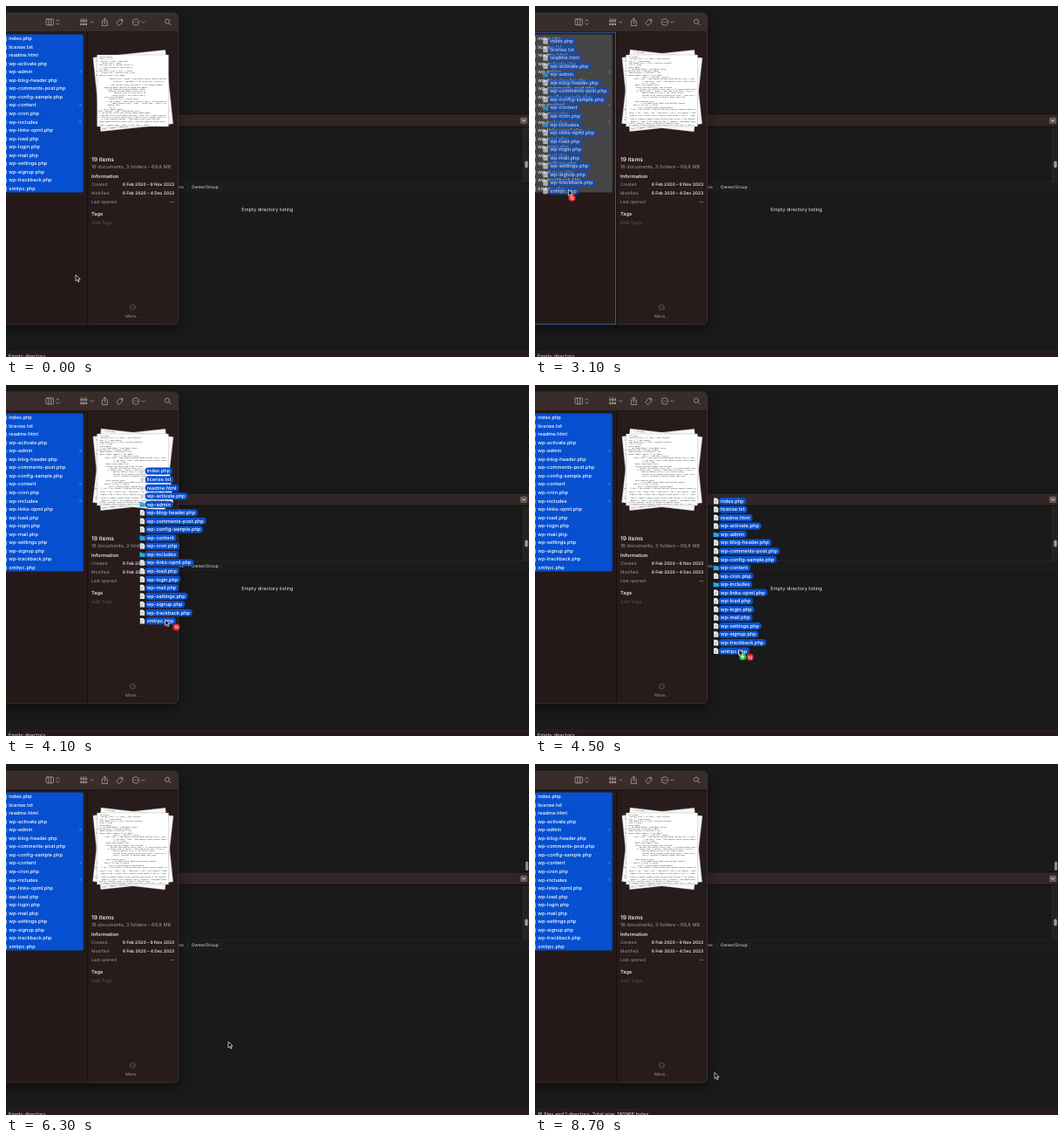
These frames come from a looping animation (600 px wide and 402 px high, 8.8 s). An HTML page:

```html
<!DOCTYPE html>
<html lang="en">
<head>
<meta charset="utf-8">
<title>Dragging files to an empty folder</title>
<style>
html, body { margin: 0; width: 100%; height: 100%; overflow: hidden; background: #1a1a1a; }
svg { display: block; width: 100vw; height: 100vh; }
text { font-family: Inter, "Open Sans", sans-serif; text-rendering: geometricPrecision; fill: #e6e3e2; white-space: pre; }
.name { font-size: 5.6px; font-weight: 500; fill: #fff; }
.bold { font-weight: 600; }
.dim { fill: #a19897; }
.code text { font: 1.9px "Liberation Mono", monospace; fill: #111; }
.icon { fill: none; stroke: #aaa19f; stroke-width: .8; stroke-linecap: round; stroke-linejoin: round; }
.faint { stroke: #857a79; stroke-width: .55; }
</style>
</head>
<body>
<svg id="stage" viewBox="0 0 600 402" preserveAspectRatio="none">
  <defs>
    <clipPath id="front"><rect x="104.500" y="56" width="82" height="82"/></clipPath>
    <filter id="shade" x="-20%" y="-20%" width="140%" height="140%" color-interpolation-filters="sRGB">
      <feDropShadow dx="0" dy="5" stdDeviation="7" flood-color="#000" flood-opacity=".5"/>
    </filter>
  </defs>

  <!-- transfer client -->
  <rect width="600" height="402" fill="#1a1a1a"/>
  <rect y="123" width="600" height="16" fill="#151111"/>
  <rect y="124.300" width="600" height="13.500" fill="#312625"/>
  <rect x="590" y="127.500" width="8" height="7.500" rx="1.500" fill="#675c5a"/>
  <path d="M592.300 130.300l1.700 1.800 1.700-1.800" fill="none" stroke="#eee" stroke-width=".9"/>
  <rect x="593.500" y="139" width="6.500" height="62" fill="#272020"/>
  <rect x="593.200" y="139" width=".6" height="62" fill="#3c3231"/>
  <rect x="595.300" y="177.500" width="3.400" height="8" rx="1.700" fill="#a29b9a"/>
  <rect y="201" width="600" height="1.200" fill="#292121"/>
  <rect y="202.200" width="600" height="9.300" fill="#1c1b1b"/>
  <rect y="211.500" width="600" height=".6" fill="#272626"/>
  <path d="M208.800 204v6.500M246.800 204v6.500" stroke="#363535" stroke-width=".6"/>
  <text x="195.500" y="208.700" font-size="4.850">ons</text>
  <text x="212.800" y="208.700" font-size="4.850">Owner/Group</text>
  <text id="empty" x="270.300" y="234.700" font-size="5.600">Empty directory listing</text>
  <rect id="thumb" x="596" y="111.500" width="3.200" height="10.500" rx="1.600" fill="#8b8b8b"/>
  <rect y="395.800" width="600" height="6.200" fill="#261b1b"/>
  <rect y="395.500" width="600" height=".6" fill="#312626"/>
  <text id="status" x="2.800" y="402.900" font-size="5.680"></text>

  <!-- file window -->
  <g filter="url(#shade)">
    <rect x="-12" y="8" width="209.700" height="356.700" rx="5.500" fill="#281b1b" stroke="#51474600" stroke-width=".6"/>
  </g>
  <path d="M0 8.400H192.200a5.100 5.100 0 0 1 5.100 5.100V29.500H0z" fill="#382d2b"/>
  <rect x="-12" y="8" width="209.700" height="356.700" rx="5.500" fill="none" stroke="#514746" stroke-width=".6"/>
  <rect y="30" width="93.500" height="334.300" fill="#251a19"/>
  <path d="M0 29.700H197.300" stroke="#181111" stroke-width=".7"/>
  <path d="M93.700 30V364.300" stroke="#120c0c" stroke-width=".8"/>
  <g class="icon">
    <rect x="46" y="15" width="8.500" height="6.800" rx="1"/>
    <path d="M48.900 15v6.800M51.700 15v6.800M57.800 17.200l1.600-1.700 1.600 1.700M57.800 19.800l1.600 1.700 1.600-1.700"/>
    <path d="M85.500 15h7.500M85.500 18.900h7.500" stroke-width=".5"/>
    <path d="M85.300 16.900h2m.8 0h2m.8 0h2M85.300 21h2m.8 0h2m.8 0h2" stroke-width="1.900" stroke-linecap="butt"/>
    <path d="M96.700 17.800l1.600 1.600 1.600-1.600M155.700 17.800l1.600 1.600 1.600-1.600"/>
    <path d="M111.800 17.200h-1.500v5.300h6v-5.300h-1.500M113.300 20v-5.800m-1.700 1.600l1.700-1.700 1.700 1.700"/>
    <path d="M127 19.300l3.500-4h2.800l.5.500v2.800l-4 3.700z"/>
    <circle cx="132.200" cy="16.800" r=".3"/>
    <circle cx="148.800" cy="18.500" r="3.700"/>
    <path d="M147.100 18.500h.01m1.690 0h.01m1.690 0h.01" stroke-width="1"/>
    <circle cx="185" cy="17.700" r="2.600"/><path d="M187 19.700l2 2"/>
  </g>
  <rect id="panel" x="-2" y="32.600" width="90.700" height="181" rx="1.600"/>
  <g id="list"></g>
  <rect id="target" x="-2" y="30.300" width="94.500" height="334" fill="none" stroke="#315f9f" stroke-width=".9"/>

  <g id="papers" stroke="#999" stroke-width=".3" fill="#f8f8f8">
    <g class="code" transform="rotate(-6 145.700 97)"><rect x="104" y="54.500" width="83.500" height="85"/></g>
    <g id="extra" class="code" transform="rotate(6.500 145.700 97)"><rect x="104" y="54.500" width="83.500" height="85"/></g>
    <rect x="104.500" y="56" width="82" height="82" fill="#fff"/>
  </g>
  <g clip-path="url(#front)"><g id="codeA" class="code"></g><g id="codeB" class="code"></g></g>

  <text class="bold" x="98" y="177.500" font-size="6.550">19 items</text>
  <text class="dim" x="98" y="186.200" font-size="5.580">16 documents, 3 folders – 69,8 MB</text>
  <text class="bold" x="98" y="196.700" font-size="5.600">Information</text>
  <g font-size="4.920">
    <text class="dim" x="98" y="206.300">Created</text>
    <text class="dim" x="98" y="216.300">Modified</text>
    <text class="dim" x="98" y="226.300">Last opened</text>
    <g class="bold" text-anchor="end">
      <text x="193.200" y="206.300">6 Feb 2020 – 9 Nov 2023</text>
      <text x="193.200" y="216.300">6 Feb 2020 – 4 Dec 2023</text>
      <text x="193.200" y="226.300">--</text>
    </g>
  </g>
  <path d="M98 209.200H193M98 219.200H193" stroke="#352828" stroke-width=".5"/>
  <text class="bold" x="98" y="240.200" font-size="5.600">Tags</text>
  <text x="98" y="250" font-size="5.400" style="fill:#5d504f">Add Tags...</text>
  <g class="icon faint">
    <circle cx="145.300" cy="345.200" r="3"/>
    <path d="M143.900 345.200h.01m1.390 0h.01m1.390 0h.01"/>
  </g>
  <text class="dim" x="145.300" y="357.300" font-size="4.950" text-anchor="middle">More...</text>

  <g id="drag"></g>
  <g id="pointer">
    <g id="plus">
      <circle cx="4.300" cy="8.300" r="4" fill="#1fc332"/>
      <path d="M2.300 8.300h4M4.300 6.300v4" stroke="#fff" stroke-width="1"/>
    </g>
    <g id="badge">
      <circle r="4.100" fill="#e3242b"/>
      <text y="1.800" font-size="5" text-anchor="middle" class="bold">19</text>
    </g>
    <path d="M0 0V6.900L1.700 5.400 2.800 8 4 7.500 2.900 5H5.200Z" fill="#000" stroke="#fff" stroke-width=".7" stroke-linejoin="round"/>
  </g>
</svg>

<script>
const $ = id => document.getElementById(id);
const LOOP = 8800, STEP = 100, ROW = 9.54;
const START = [24.3, 207.3];
const files = ['index.php', 'license.txt', 'readme.html', 'wp-activate.php', 'wp-admin',
  'wp-blog-header.php', 'wp-comments-post.php', 'wp-config-sample.php', 'wp-content',
  'wp-cron.php', 'wp-includes', 'wp-links-opml.php', 'wp-load.php', 'wp-login.php',
  'wp-mail.php', 'wp-settings.php', 'wp-signup.php', 'wp-trackback.php', 'xmlrpc.php'];

// time, x, y of the pointer tip
const path = [
  [0, 80, 308], [400, 80, 308], [800, 67, 280], [1300, 42, 236], [2100, 24.3, 207.3],
  [2800, 24.3, 207.3], [3100, 38.3, 210.3], [3400, 69, 223], [3700, 108, 239.8], [4100, 182.7, 268.7],
  [4500, 234, 303], [4900, 255, 318], [8200, 255, 318], [8500, 222, 343], [8700, 206, 353.5]
];

function add(parent, tag, attrs, content) {
  const el = document.createElementNS('http://www.w3.org/2000/svg', tag);
  for (const k in attrs) el.setAttribute(k, attrs[k]);
  if (content) el.textContent = content;
  parent.append(el);
  return el;
}

function addIcon(g, folder, y) {
  if (folder) {
    add(g, 'path', { d: `M-5 ${y - 2.4}h2.300l.7.800h3.200v4.600h-6.200z`, fill: '#27a7e8' });
  } else {
    add(g, 'path', { d: `M-4.600 ${y - 3.3}h3.400l1.800 1.800v4.800h-5.200z`, fill: '#eef0f2' });
    add(g, 'path', { d: `M-3.600 ${y - .6}h3m-3 1.400h3m-3 1.400h2`, stroke: '#8d949c', 'stroke-width': .5 });
  }
}

function buildFiles() {
  files.forEach((name, i) => {
    const y = 37.2 + i * ROW, folder = !name.includes('.');
    const list = $('list'), drag = $('drag');
    if (i) add(list, 'rect', { y: y - ROW / 2 - .2, width: 88.7, height: .4, fill: '#0a3a9a', opacity: .4 });
    addIcon(list, folder, y);
    const label = add(list, 'text', { class: 'name', x: 3.3, y: y + 1.9 }, name);
    if (folder) add(list, 'path', {
      d: `M84.600 ${y - 1.3}l1.200 1.300-1.200 1.300`, fill: 'none', stroke: '#a9c5f5', 'stroke-width': .6
    });
    addIcon(drag, folder, y);
    add(drag, 'rect', {
      x: 1.2, y: y - 4, width: label.getComputedTextLength() + 5, height: 8, rx: 4, fill: '#0a50cd'
    });
    add(drag, 'text', { class: 'name', x: 3.3, y: y + 1.9 }, name);
  });
}

function rng(seed) {
  return () => (seed = seed * 16807 % 2147483647) / 2147483647;
}

function buildCode(g, seed, x, y, rows, dense) {
  const rand = rng(seed);
  const words = ['$path', 'return', 'if', 'define(', 'array', 'echo', '* Load', 'require', 'true );', 'else {', 'function', '// set'];
  for (let i = 0; i < rows; i++) {
    const mid = i > rows * .28 && i < rows * .72;
    const count = i > rows * dense ? 6 + rand() * 7 : 1 + rand() * (mid ? 8 : 5);
    if (rand() < .12) continue;
    let line = '';
    for (let n = 0; n < count; n++) line += words[rand() * words.length | 0] + ' ';
    const indent = mid ? 6 + rand() * 12 : rand() * 4;
    add(g, 'text', { x: x + indent, y: y + i * 2.3, stroke: 'none' }, line.slice(0, (80 - indent) / 1.15));
  }
}

function pointerAt(t) {
  const i = path.findIndex(p => p[0] > t);
  if (i < 0) return path[path.length - 1].slice(1);
  const a = path[i - 1], b = path[i], f = (t - a[0]) / (b[0] - a[0]);
  return [a[1] + (b[1] - a[1]) * f, a[2] + (b[2] - a[2]) * f];
}

const show = (id, on) => { $(id).style.display = on ? '' : 'none'; };

function draw(t) {
  const [x, y] = pointerAt(t);
  const dragging = t >= 2800 && t < 5200;
  const over = t >= 2900 && t < 3700;
  $('pointer').setAttribute('transform', `translate(${x} ${y})`);
  $('drag').setAttribute('transform', `translate(${x - START[0]} ${y - START[1]})`);
  $('drag').setAttribute('opacity', Math.min(1, .72 + Math.max(0, t - 3700) / 1000));
  $('badge').setAttribute('transform', `translate(${over ? 4 : 12.7} ${over ? 9.5 : 8.8})`);
  show('drag', dragging);
  show('badge', dragging);
  show('plus', dragging && t >= 4400);
  show('target', over);
  $('panel').setAttribute('fill', over ? '#474545' : '#0650d1');
  $('list').setAttribute('opacity', over ? .85 : 1);
  const full = t >= 900;
  show('extra', full);
  show('codeA', !full);
  show('codeB', full);
  show('empty', t < 5600);
  show('thumb', t >= 5400);
  $('status').textContent = t < 7000 ? 'Empty directory' : '16 files and 1 directory. Total size: 180966 bytes';
}

buildFiles();
buildCode($('codeA'), 421, 106, 59, 35, .78);
buildCode($('codeB'), 977, 106, 59, 35, .72);
document.querySelectorAll('#papers .code').forEach((g, i) => buildCode(g, 55 + i * 31, 105, 57, 36, .8));

const begin = performance.now();
function tick(now) {
  const t = Math.max(0, now - begin) % LOOP;
  draw(Math.floor(t / STEP) * STEP);
  requestAnimationFrame(tick);
}
draw(0);
requestAnimationFrame(tick);
</script>
</body>
</html>
```
